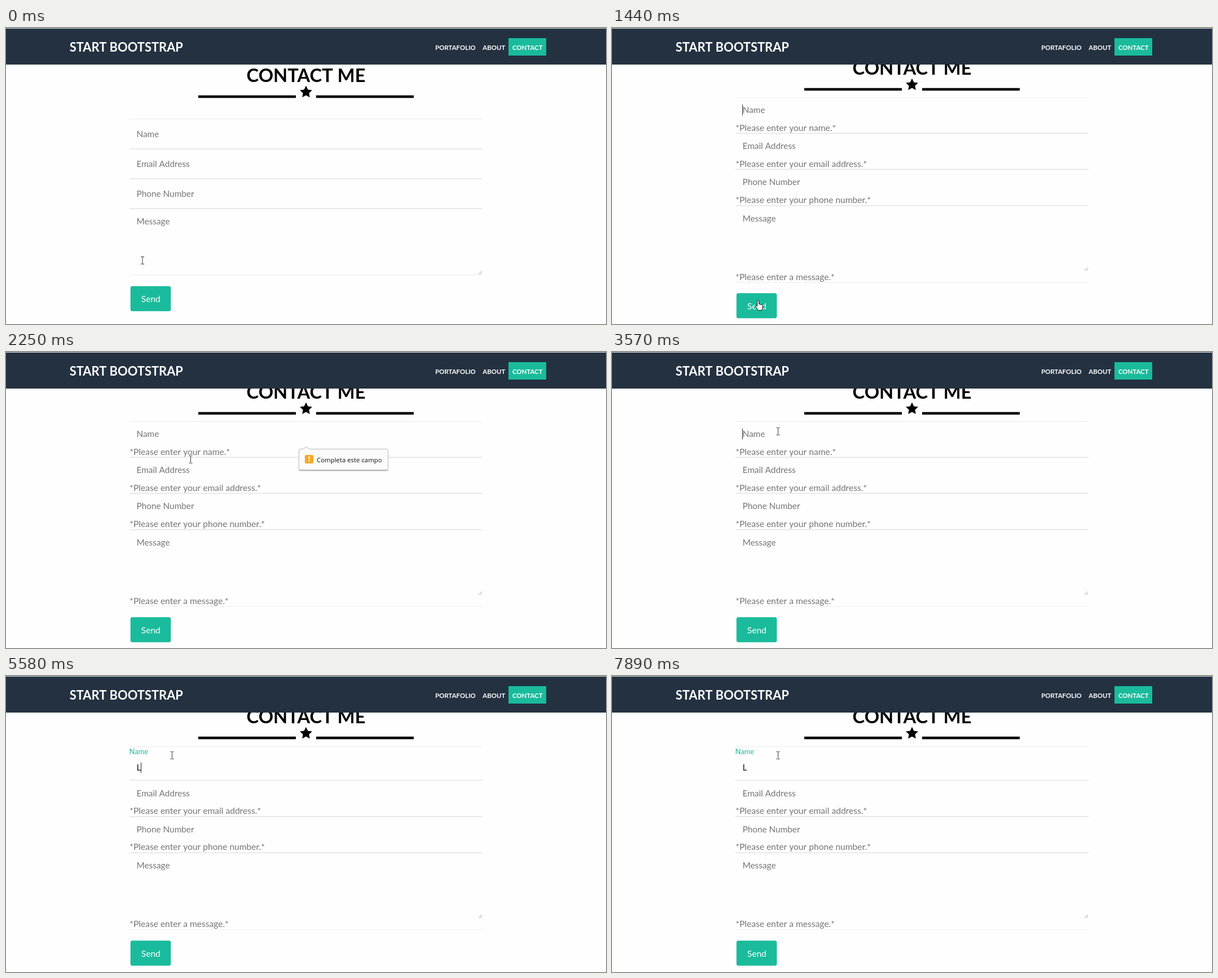
Animation, 1064 px wide and 526 px high, one loop 8000 ms. Source, as an HTML page with a canvas:

```html
<!DOCTYPE html>
<html lang="en">
<head>
<meta charset="utf-8">
<title>Contact form</title>
<style>
html, body { margin: 0; width: 100%; height: 100%; overflow: hidden; background: #fefefe; }
canvas { display: block; }
</style>
</head>
<body>
<canvas id="stage" width="1064" height="526"></canvas>
<script>
const ctx = document.getElementById('stage').getContext('2d');
const LOOP = 8000, STEP = 30;
const TEAL = '#1abb9c', GREY = '#757575', PAGE = '#fefefe';
const LEFT = 219, RIGHT = 845, FIELD_X = 231.5, FIELD_SIZE = 15.35;

const fieldNames = ['Name', 'Email Address', 'Phone Number', 'Message'];
const errorNames = ['your name', 'your email address', 'your phone number', 'a message'];

// Vertical positions: heading shift, rules, field and error baselines, button, grip
const plain = { head: 0, rules: [161, 214, 267, 320, 438], fields: [194, 247, 300, 349], errors: [], button: 459, grip: 438 };
const invalid = { head: -13, rules: [123, 186.5, 250.5, 315, 451.5], fields: [151, 215, 279, 344], errors: [183, 247, 311, 448], button: 471.5, grip: 432 };
const typing = { head: -12, rules: [125, 184.5, 249, 313.5, 450], fields: [168, 214, 278, 342], errors: [0, 245, 309, 446], button: 470.5, grip: 430.5 };

// [time, x, y]
const pointerPath = [
  [30, 242, 413], [270, 269, 461], [510, 259, 484], [1830, 259, 484],
  [2250, 327.5, 191], [2430, 301, 173], [3120, 301, 173], [3300, 294.5, 141]
];
// [time, visible]
const caretBlinks = [
  [0, 0], [1440, 1], [1860, 0], [2340, 1], [3150, 0], [3570, 1], [3930, 0], [4260, 1],
  [5190, 0], [5580, 1], [6030, 0], [6150, 1], [7080, 0], [7470, 1], [7890, 0]
];
// [time, typed text]
const typed = [
  [0, ''], [4680, 'L'], [6150, 'Lo'], [6390, 'Lor'], [6510, 'Lore'], [6660, 'Lores'],
  [7470, 'Lore'], [7650, 'Lor'], [7770, 'Lo'], [7890, 'L']
];

const latest = (list, t) => list.filter(k => k[0] <= t).pop()[1];
const ramp = (t, from, to) => Math.max(0, Math.min(1, (t - from) / (to - from)));
const ease = p => p * p * (3 - 2 * p);

function pointerAt(t) {
  const i = pointerPath.findIndex(k => k[0] > t);
  if (i < 0) return pointerPath[pointerPath.length - 1].slice(1);
  if (i === 0) return pointerPath[0].slice(1);
  const [t0, x0, y0] = pointerPath[i - 1], [t1, x1, y1] = pointerPath[i];
  const p = ease(ramp(t, t0, t1));
  return [x0 + (x1 - x0) * p, y0 + (y1 - y0) * p];
}

function rect(x, y, w, h, color) {
  ctx.fillStyle = color;
  ctx.fillRect(x, y, w, h);
}

function rounded(x, y, w, h, r, color) {
  ctx.fillStyle = color;
  ctx.beginPath();
  ctx.roundRect(x, y, w, h, r);
  ctx.fill();
}

function text(str, x, y, size, color, { bold = false, align = 'left', family = 'Lato' } = {}) {
  ctx.font = `${bold ? 700 : 400} ${size}px ${family}, sans-serif`;
  ctx.textAlign = align;
  ctx.fillStyle = color;
  ctx.fillText(str, x, y);
}

function shape(d, x, y, fill, stroke) {
  const path = new Path2D(d);
  ctx.save();
  ctx.translate(x, y);
  ctx.lineWidth = 1;
  ctx.lineJoin = 'round';
  ctx.fillStyle = fill;
  ctx.fill(path);
  ctx.strokeStyle = stroke;
  ctx.stroke(path);
  ctx.restore();
}

function drawHeading(dy) {
  text('CONTACT ME', 532, 96 + dy, 32.7, '#000', { bold: true, align: 'center' });
  rect(341, 119.7 + dy, 173, 4.6, '#000');
  rect(550, 119.7 + dy, 173, 4.6, '#000');
  ctx.beginPath();
  for (let i = 0; i < 10; i++) {
    const r = i % 2 ? 5.6 : 11.5, a = i * Math.PI / 5;
    ctx.lineTo(532 + r * Math.sin(a), 114 + dy - r * Math.cos(a));
  }
  ctx.fill();
}

function drawNav() {
  rect(0, 0, 1064, 1, '#e3e3e3');
  rect(0, 1, 1064, 64, '#243140');
  rect(891, 18, 67, 31, TEAL);
  const white = { bold: true, align: 'center' };
  text('START BOOTSTRAP', 213.3, 42, 21.9, '#fff', white);
  text('PORTAFOLIO', 797, 38.8, 11.45, '#fff', white);
  text('ABOUT', 865.3, 38.8, 11.45, '#fff', white);
  text('CONTACT', 924.7, 38.8, 11.45, '#fff', white);
}

function drawForm(form, value) {
  form.rules.forEach((y, i) => {
    const outer = i % 4 === 0;
    rect(LEFT, y, RIGHT - LEFT, outer ? 1 : 1.5, outer ? '#ececec' : '#e4e4e4');
  });
  form.fields.forEach((y, i) => {
    const filled = i === 0 && value;
    text(filled ? value : fieldNames[i], FIELD_X, y, FIELD_SIZE, filled ? '#111' : GREY);
  });
  form.errors.forEach((y, i) => {
    if (y) text(`*Please enter ${errorNames[i]}.*`, LEFT + 0.3, y, 15.6, GREY);
  });
  ctx.strokeStyle = '#8a8a8a';
  ctx.lineWidth = 0.8;
  ctx.beginPath();
  for (const n of [6, 3]) {
    ctx.moveTo(844 - n, form.grip - 0.5);
    ctx.lineTo(844, form.grip - 0.5 - n);
  }
  ctx.stroke();
  rounded(220.7, form.button - 0.2, 71.6, 44.4, 3.5, TEAL);
  text('Send', 256.8, form.button + 28.3, 15.6, '#fff', { align: 'center' });
}

function drawBubble(alpha) {
  ctx.save();
  ctx.globalAlpha = alpha;
  rounded(519, 173, 159, 38.5, 3, '#b9b9b9');
  shape('M2 0H7L13-4 19 0H156q2 0 2 2V35q0 2-2 2H2q-2 0-2-2V2q0-2 2-2z', 519.5, 172.5, '#fbfbfb', '#b8b8b8');
  rounded(530, 183, 15, 15, 2, '#f7a823');
  rect(536.5, 185.5, 2, 6, '#fff');
  rect(536.5, 193, 2, 2, '#fff');
  text('Completa este campo', 551, 196, 11.4, '#111', { family: 'Open Sans' });
  ctx.restore();
}

function drawHint(alpha) {
  ctx.save();
  ctx.globalAlpha = alpha;
  shape('M0 0H98V16H0z', 302.5, 150.5, '#fff', '#c4c4c4');
  text('Completa este campo', 306, 161.5, 9, '#575757', { family: 'Open Sans' });
  ctx.restore();
}

function drawPointer(x, y, form) {
  if (y >= form.button) {
    shape('M-1.5 1q1.5-2 3 0V6.5l5 1.2q2 .6 1.8 2.6l-.8 4-1 3.5H.5L-4.5 11q-1-2 1-2l2 1.5z', x, y, '#fff', '#111');
  } else if (y > form.rules[4]) {
    shape('M0 0v13l3-3 2 5 2-1-2-5h4z', x, y, '#fff', '#111');
  } else {
    shape('M-3-6.5H-1L0-6 1-6.5H3M0-6V6M-3 6.5H-1L0 6 1 6.5H3', x, y, 'transparent', '#3a3a3a');
  }
}

function draw(t) {
  const value = latest(typed, t);
  const form = t < 1440 ? plain : t < 4680 ? invalid : typing;
  rect(0, 0, 1064, 526, PAGE);
  drawHeading(form.head);
  drawNav();
  drawForm(form, value);

  if (value) {
    const p = ease(ramp(t, 4650, 4860));
    ctx.globalAlpha = p;
    text('Name', 218.5, 139 + 26 * (1 - p), 12.9, TEAL);
    ctx.globalAlpha = 1;
  }
  if (latest(caretBlinks, t)) {
    ctx.font = `400 ${FIELD_SIZE}px Lato, sans-serif`;
    const x = Math.floor(FIELD_X + 0.4 + ctx.measureText(value).width);
    rect(x, value ? 154 : 136, 1, value ? 18 : 19, '#222');
  }

  const bubble = ramp(t, 1440, 1620) * (1 - ramp(t, 2400, 2550));
  if (bubble) drawBubble(bubble);
  const hint = ramp(t, 3270, 3390) * (1 - ramp(t, 3450, 3570));
  if (hint) drawHint(hint);
  drawPointer(...pointerAt(t), form);
}

const start = performance.now();
function tick() {
  const t = (performance.now() - start) % LOOP;
  draw(Math.floor(t / STEP) * STEP);
  requestAnimationFrame(tick);
}
tick();
</script>
</body>
</html>
```
